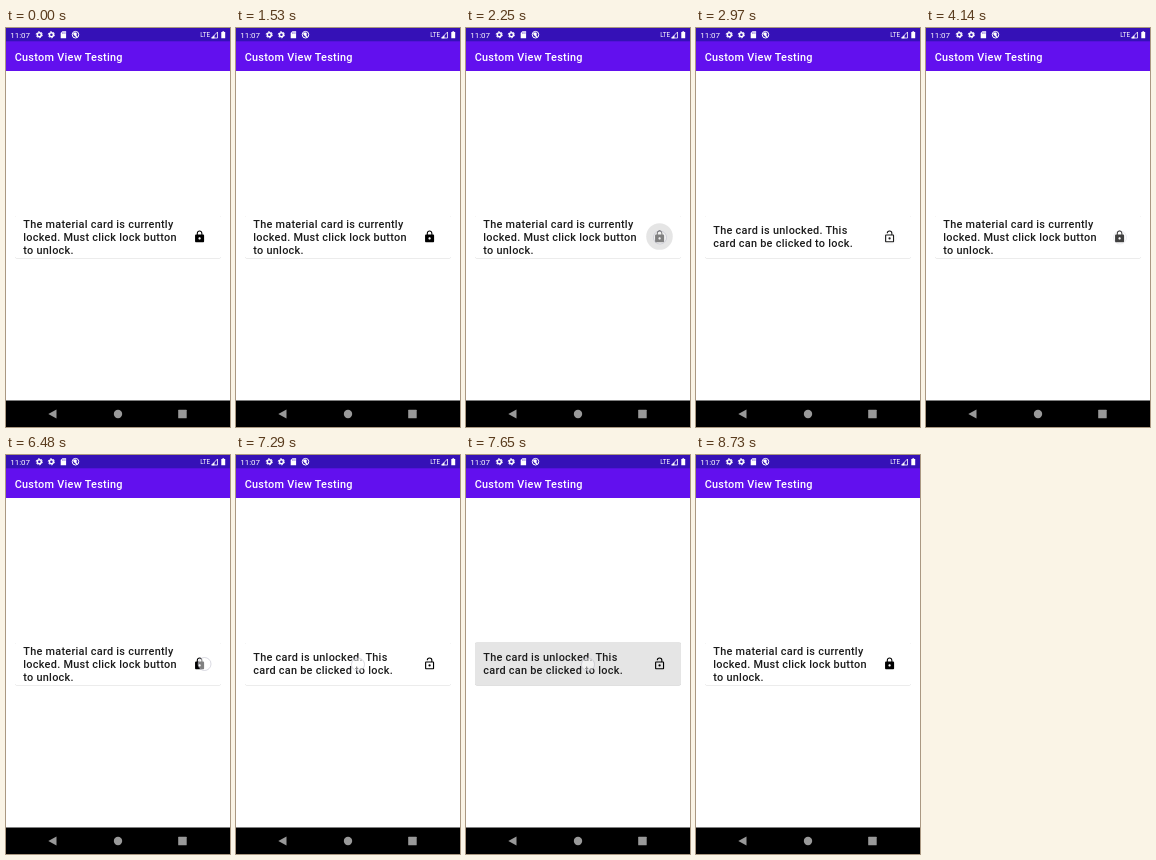
Recreate the animation shown at these times as an HTML page. Size 224 by 399 pixels, loop 8.82 s.

```html
<!DOCTYPE html>
<html lang="en">
<head>
<meta charset="utf-8">
<title>Custom View Testing</title>
<style>
  html, body { margin: 0; width: 100%; height: 100%; overflow: hidden; background: #fff; }
  svg { display: block; width: 224px; height: 399px; font-family: Roboto, sans-serif; }
  .card { fill: #fff; filter: drop-shadow(0 .8px .7px rgba(0, 0, 0, .3)); }
  .title { font-size: 10.9px; font-weight: 500; letter-spacing: .024em; }
  .message { fill: #1c1c1c; }
</style>
</head>
<body>
<svg viewBox="0 0 224 399">
  <defs>
    <clipPath id="cardClip"><rect x="9" y="187" width="206" height="43.5" rx="2"/></clipPath>
    <g id="gear" fill="none" stroke="#fff">
      <circle r="2" stroke-width="1.5"/>
      <circle r="3.1" stroke-width="1" stroke-dasharray="1.6 1.646"/>
    </g>
  </defs>

  <rect width="224" height="399" fill="#fff"/>
  <rect y="13" width="224" height="30" fill="#6210ee"/>
  <rect width="224" height="13.3" fill="#3511b7"/>
  <g fill="#fff">
    <text x="4.2" y="9.6" font-size="8">11:07</text>
    <use href="#gear" x="33.3" y="6.7"/>
    <use href="#gear" x="45.4" y="6.7"/>
    <path d="M56.4 3.2h3.7v7h-5.4V5z"/>
    <path d="M56.6 4.3v1.5m1.3-1.5v1.5m1.2-1.5v1.5" stroke="#3511b7" stroke-width=".5"/>
    <circle cx="69.5" cy="6.7" r="3.3" fill="none" stroke="#fff"/>
    <path d="M67.3 5l2.2-.7 1.5 1.5-.7 1.5 1.2 1.2-1 1-3-2.8z"/>
    <text x="194.2" y="9.3" font-size="6.3">LTE</text>
    <path d="M205.6 10l5.9-6v6z" fill="none" stroke="#fff" stroke-width=".8"/>
    <path d="M205.3 10.2l3.2-3.3v3.3z"/>
    <path d="M215.3 4h1.1v-.8h1.7V4h1.1v6.3h-3.9z"/>
    <text class="title" x="8.7" y="32.8">Custom View Testing</text>
  </g>

  <rect class="card" x="9" y="187" width="206" height="43.5" rx="2"/>
  <rect y="183" width="224" height="5" fill="#fff"/>
  <g clip-path="url(#cardClip)"><circle id="cardRipple" cx="122" cy="209.5"/></g>
  <circle id="iconRipple" cx="193.5" cy="208.5"/>
  <g id="locked">
    <g class="title message">
      <text x="17.3" y="199.8">The material card is currently</text>
      <text x="17.3" y="212.7">locked. Must click lock button</text>
      <text x="17.3" y="225.5">to unlock.</text>
    </g>
    <path transform="translate(186.8 201.9) scale(.565)" d="M18 8h-1V6c0-2.76-2.24-5-5-5S7 3.24 7 6v2H6c-1.1 0-2 .9-2 2v10c0 1.1.9 2 2 2h12c1.1 0 2-.9 2-2V10c0-1.1-.9-2-2-2zm-6 9c-1.1 0-2-.9-2-2s.9-2 2-2 2 .9 2 2-.9 2-2 2zm3.1-9H8.9V6a3.1 3.1 0 0 1 6.2 0z"/>
  </g>
  <g id="unlocked">
    <g class="title message">
      <text x="17.3" y="206.2">The card is unlocked. This</text>
      <text x="17.3" y="219.1">card can be clicked to lock.</text>
    </g>
    <path transform="translate(186.8 201.9) scale(.565)" d="M12 17a2 2 0 1 0 0-4 2 2 0 0 0 0 4zm6-9h-1V6A5 5 0 0 0 7 6h1.9a3.1 3.1 0 0 1 6.2 0v2H6c-1.1 0-2 .9-2 2v10c0 1.1.9 2 2 2h12c1.1 0 2-.9 2-2V10c0-1.1-.9-2-2-2zm0 12H6V10h12z"/>
  </g>
  <circle id="pointer" r="6.5" fill="#fff" fill-opacity=".5" stroke="#aaaabc" stroke-opacity=".55" stroke-width=".8"/>

  <rect y="372.5" width="224" height="26.5" fill="#000"/>
  <g fill="#999">
    <path d="M42.3 386l8.2-4.6v9.2z"/>
    <circle cx="112" cy="386" r="4.2"/>
    <rect x="172.2" y="381.8" width="8.5" height="8.5" rx=".5"/>
  </g>
</svg>
<script>
  const LOOP = 8820, STEP = 90;
  const el = id => document.getElementById(id);
  const ramp = (t, from, to) => Math.min(1, Math.max(0, (t - from) / (to - from)));

  // Touch position, then the times of press, release and full fade-out
  const touches = [
    [194, 209.5, 1890, 2610, 3060],
    [194, 209.5, 3240, 3960, 4320],
    [120.5, 210, 4950, 5130, 5400],
    [120.5, 210, 5400, 5580, 5850],
    [120.5, 210, 5850, 6030, 6300],
    [198.5, 209, 6480, 6840, 7200],
    [122, 209.5, 7290, 8280, 8730]
  ];
  // Ripple start, full size, release and end
  const iconRipples = [[1980, 2250, 2610, 2790], [3330, 3690, 3960, 4140], [6570, 6840, 6840, 7110]];
  const cardRipples = [[7290, 7650, 8190, 8280]];
  const unlockedSpans = [[2610, 3960], [6840, 8280]];

  function drawRipple(circle, ripples, radius, t) {
    const r = ripples.find(([start, , , end]) => t >= start && t < end);
    circle.setAttribute('r', r ? radius * Math.sqrt(ramp(t, r[0], r[1])) : 0);
    circle.setAttribute('opacity', r ? .1 * (1 - ramp(t, r[2], r[3])) : 0);
  }

  function draw(now) {
    const t = Math.floor(now % LOOP / STEP) * STEP;
    const open = unlockedSpans.some(([from, to]) => t >= from && t < to);
    el('locked').style.display = open ? 'none' : '';
    el('unlocked').style.display = open ? '' : 'none';

    drawRipple(el('iconRipple'), iconRipples, 13.3, t);
    drawRipple(el('cardRipple'), cardRipples, 117, t);

    const touch = touches.find(([, , down, , end]) => t >= down && t < end);
    el('pointer').setAttribute('opacity', touch ? 1 - ramp(t, touch[3], touch[4]) : 0);
    if (touch) el('pointer').setAttribute('transform', `translate(${touch[0]} ${touch[1]})`);
  }

  const begin = performance.now();
  function tick() {
    draw(performance.now() - begin);
    requestAnimationFrame(tick);
  }
  tick();
</script>
</body>
</html>
```
